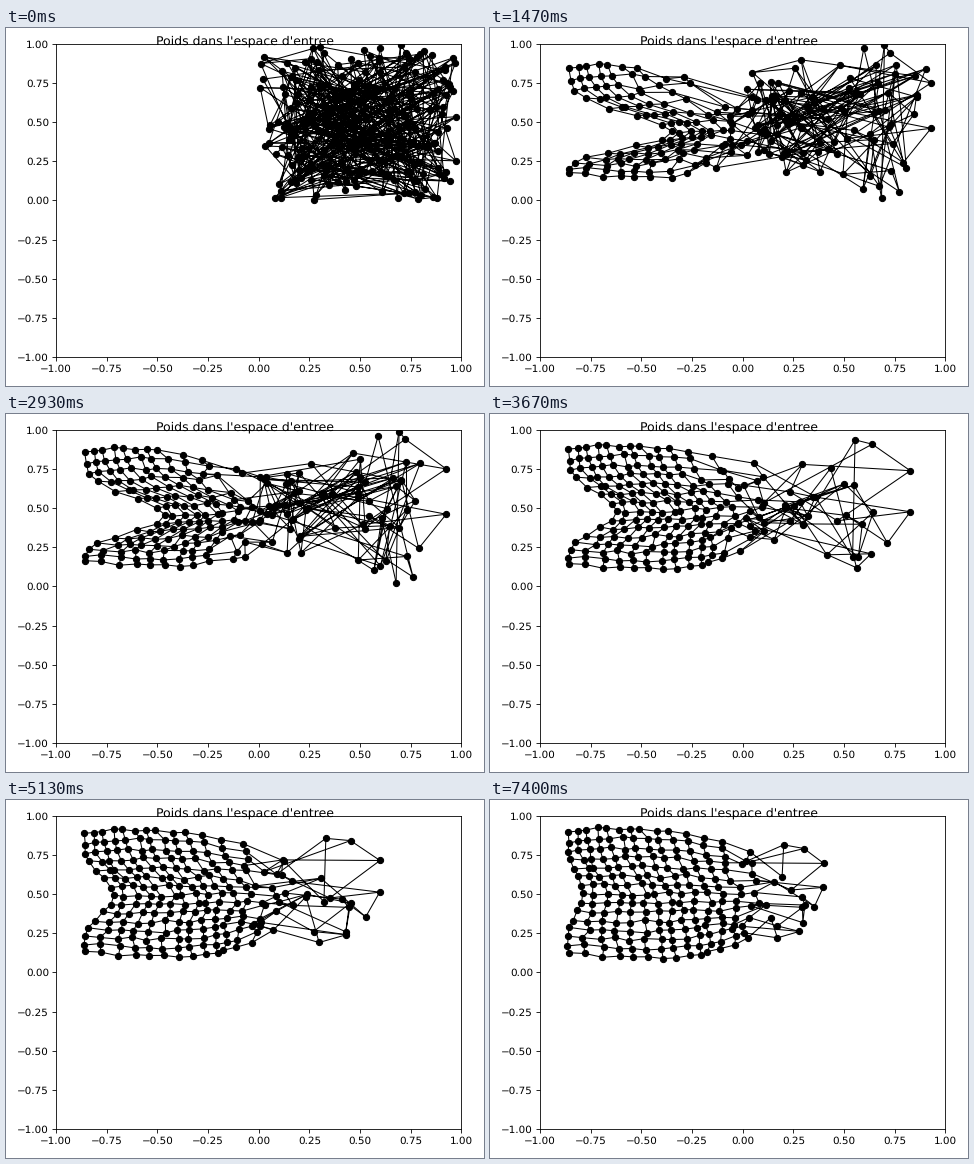
Animation of 478x358 px, one loop 8070 ms. Source, as a matplotlib script:

```python
import numpy as np
import matplotlib.pyplot as plt
from matplotlib.animation import FuncAnimation

SIZE = 15            # the map is SIZE x SIZE neurons
STATES = 11          # snapshots of the training shown per loop
FRAMES, STEP_MS = 269, 30

rng = np.random.default_rng(7)
row, col = np.mgrid[:SIZE, :SIZE]
u, v = col / (SIZE - 1), row / (SIZE - 1)

# Random weights; the last column lies far right and is pulled in last.
start = rng.beta(1.2, 1.2, (SIZE, SIZE, 2))
start[:, -1, 0] = .4 + .4 * start[:, -1, 0]
start[1:6:2, -1] = (.70, .99), (.93, .75), (.93, .46)
wobble = rng.normal(0, .007, start.shape)
delay = rng.normal(0, .2, (SIZE, SIZE))


def unfolded(state):
    """Ordered map over the input square, with a fold on its left that fades."""
    fold = np.exp(-.26 * state)
    dent = .85 * fold * np.exp(-((v - .5) / .22) ** 2) * (1 - u / 2)
    slant = .17 * (v - .5) * np.sin(np.pi * u)
    half = .42 - .3 * (u - .35) ** 2 - .1 * fold
    sag = .13 * fold * np.sin(np.pi * v) * (1 - u)
    x = -.86 + .9 * u + slant + dent
    y = .505 + half * (1 - 2 * v) - sag
    return np.stack([x, y], axis=-1) + wobble


def weights(state):
    """Neurons gather towards the middle, then settle as the front passes."""
    if state == 0:
        return start
    front = 14.6 * (1 - np.exp(-.38 * state)) + (row - 6) ** 2 / 64
    order = 1 / (1 + np.exp((col + delay - front) / .77))
    pull = (1 - np.exp(-.13 * state)) * np.minimum(1, (SIZE - 1 - col) / 5)
    loose = start + pull[..., None] * (np.array([.3, .52]) - start)
    return loose + order[..., None] * (unfolded(state) - loose)


def strands(grid):
    """Join the rows of a grid into one polyline with gaps between them."""
    gap = np.full((SIZE, 1, 2), np.nan)
    return np.concatenate([grid, gap], axis=1).reshape(-1, 2).T


snapshots = [weights(k) for k in range(STATES)]

plt.rcParams["text.hinting"] = "no_hinting"
fig = plt.figure(figsize=(6.4, 4.79331), dpi=74.6875, facecolor="white")
ax = fig.add_axes([50.2 / 478, 28.6 / 358, 405.1 / 478, 313.8 / 358])
ax.set(xlim=(-1, 1), ylim=(-1, 1))
fig.suptitle("Poids dans l'espace d'entree", fontsize=12)
across, = ax.plot([], [], "ko-", lw=1, ms=6)
down, = ax.plot([], [], "k-", lw=1)


def update(frame):
    grid = snapshots[int((frame + .5) * STATES / FRAMES)]
    across.set_data(*strands(grid))
    down.set_data(*strands(grid.swapaxes(0, 1)))
    return across, down


anim = FuncAnimation(fig, update, frames=FRAMES, interval=STEP_MS,
                     repeat=True, repeat_delay=0)
plt.show()
```
